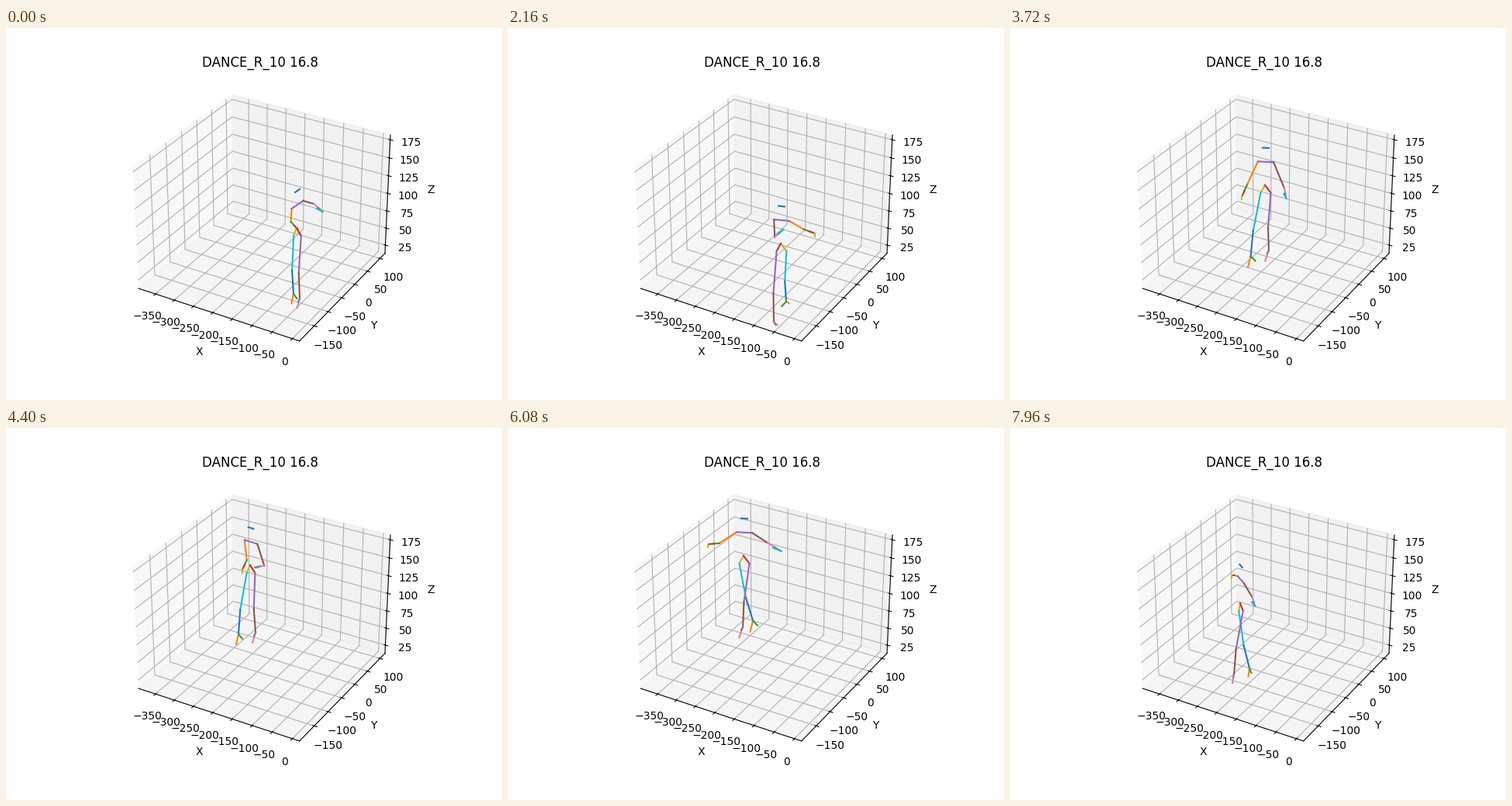
Recreate the animation shown at these times as a matplotlib script. Size 640 by 480 pixels, loop 8000 ms.

```python
import numpy as np
import matplotlib.pyplot as plt
from matplotlib.animation import FuncAnimation

STEP, FRAMES = 40, 200

# Stage points are complex numbers in pixels: x + y*j, y downwards.
# time: pelvis, turn in degrees, sway, half step, then upper arm and forearm, left and right
POSES = {
    0: (375+258j, 82, 0, 4+3j, -1+17j, 9+10j, 14+4j, 11+10j),
    2160: (352+278j, 195, -1, -8+13j, 19+11j, 14+5j, 1+23j, 11-10j),
    3080: (342+232j, 69, -6, 7-3j, -12+31j, 9+13j, 4+32j, 7+19j),
    4400: (315+177j, -2, -4, 11-1j, 3+26j, -6+13j, 9+28j, -12+2j),
    5320: (305+156j, 19, 7, 0, -8+27j, 2j, 10+15j, 5+8j),
    6760: (304+184j, 9, 2, -10+7j, -17+3j, -14+3j, 15+14j, 10+11j),
    7960: (297+226j, -30, 2, -10+4j, -4-1j, -4, 10+17j, 4+12j),
}
TIMES = np.array(list(POSES), float)
KEYS = np.array(list(POSES.values()))
SLOPES = np.gradient(KEYS, TIMES, axis=0)

# One floor unit along x and y as seen on the stage
FLOOR_X, FLOOR_Y = 0.5 + 0.144j, 0.37 - 0.32j
SHOULDER_WIDTH = 34


def blend(t):
    """Hermite curve through the poses, with the progress between two of them."""
    i = min(np.searchsorted(TIMES, t, "right"), len(TIMES) - 1) - 1
    h = TIMES[i + 1] - TIMES[i]
    u = (t - TIMES[i]) / h
    ease = u * u * (3 - 2 * u)
    values = (KEYS[i] + ease * (KEYS[i + 1] - KEYS[i])
              + h * u * (1 - u) * ((1 - u) * SLOPES[i] - u * SLOPES[i + 1]))
    return values, u


def arm(shoulder, upper, fore):
    elbow = shoulder + upper
    return shoulder, elbow, elbow + fore / 2, elbow + fore


def leg(pelvis, hip, ankle):
    knee = hip + 0.6 * (ankle - hip) - 2
    return pelvis, hip, knee, ankle


def chain(points, color):
    """Bones along a chain, each in the next colour of the cycle."""
    return [(a, b, color + k) for k, (a, b) in enumerate(zip(points, points[1:]))]


def skeleton(t):
    """All bones as (start, end, colour index)."""
    (pelvis, turn, sway, step, l_up, l_fore, r_up, r_fore), u = blend(t)
    angle = np.radians(turn.real)
    half = SHOULDER_WIDTH / 2 * (np.cos(angle) * FLOOR_X + np.sin(angle) * FLOOR_Y)
    chest = pelvis + 1 - 30j
    head = chest - 18j
    hips, hip = pelvis + 1 + 10j, 0.65 * half.real
    feet = pelvis + sway + 88j

    # The arms open out between poses
    spread = 0.7 * half * np.sin(np.pi * u) ** 2
    l_arm = arm(chest - half, l_up - spread, l_fore - spread)
    r_arm = arm(chest + half, r_up + spread, r_fore + spread)
    l_leg = leg(pelvis, hips - hip, feet - step)
    r_leg = leg(pelvis, hips + hip, feet + step)
    l_hand, r_wrist, r_hand = l_arm[3], r_arm[2], r_arm[3]
    l_ankle, r_ankle = l_leg[3], r_leg[3]

    # The feet point with the body
    s = half.real / 8.5
    return [
        (head - 0.4 * half, head + 0.4 * half, 0),
        *chain(l_arm, 1),
        (chest - half, chest + half, 4),
        *chain(r_arm, 5),
        (l_hand, l_hand + 4j, 8),
        (r_wrist - 2 + 1j, r_hand, 9),
        *chain(l_leg, 8),
        (l_ankle, l_ankle - 3 * s + (8 + 5 * s) * 1j, 1),
        (l_ankle, l_ankle + 5 * s + 6j, 2),
        *chain(r_leg, 3),
        (r_ankle, r_ankle - 4 * s + (9 + 4 * s) * 1j, 6),
        (r_ankle, r_ankle - 2 * s + 4j, 7),
    ]


fig = plt.figure(figsize=(6.4, 4.8), dpi=100)
ax = fig.add_subplot(projection="3d")
ax.set(xlim=(-395.5, 17.3), ylim=(-201.3, 120.5), zlim=(12.9, 181.5),
       xticks=range(-350, 1, 50), yticks=range(-150, 101, 50),
       zticks=range(25, 176, 25), xlabel="X", ylabel="Y", zlabel="Z")
ax.set_title("DANCE_R_10 16.8")

stage = fig.add_axes([0, 0, 1, 1])
stage.set(xlim=(0, 640), ylim=(480, 0))
stage.axis("off")
lines = [stage.plot([], [], color=f"C{c % 10}")[0] for _, _, c in skeleton(0)]


def update(n):
    for line, (a, b, _) in zip(lines, skeleton(n * STEP)):
        line.set_data([a.real, b.real], [a.imag, b.imag])
    return lines


anim = FuncAnimation(fig, update, frames=FRAMES, interval=STEP,
                     repeat=True, repeat_delay=0)
plt.show()
```
